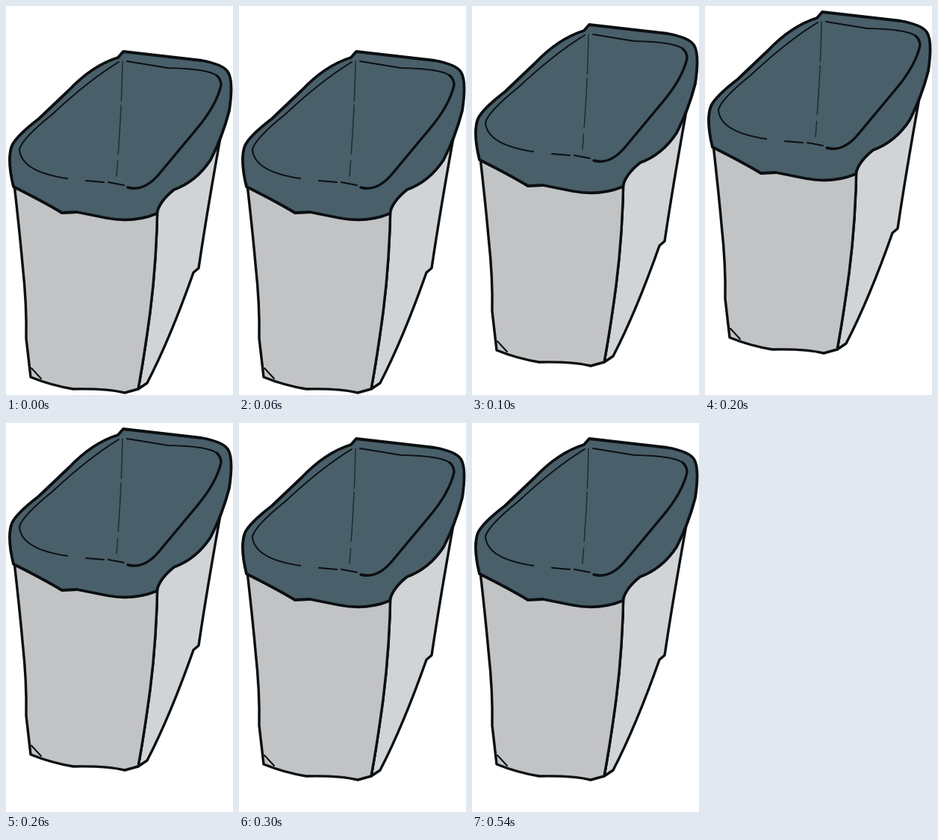
These frames come from a looping animation (304 by 521 pixels, 0.7 s). An HTML page:

```html
<!DOCTYPE html>
<html lang="en">
<head>
<meta charset="utf-8">
<title>Hopping bin</title>
<style>
  html, body { margin: 0; width: 100%; height: 100%; overflow: hidden; background: #fff; }
  svg { display: block; width: 304px; height: 521px; }
  #bin { animation: hop 700ms step-end infinite; }
  @keyframes hop {
    0% { transform: translateY(0); }
    14.2857% { transform: translateY(-36px); }
    28.5714% { transform: translateY(-53px); }
    42.8571%, 100% { transform: translateY(-40px); }
  }
  path { fill: none; stroke: #0b0f11; stroke-width: 3.4; stroke-linecap: round; stroke-linejoin: round; }
  .front { fill: #c2c3c5; }
  .side { fill: #d0d4d7; }
  .rim { fill: #495f6a; stroke-width: 3.8; }
  .thin { stroke-width: 2; }
  .crease { stroke-width: 1.5; stroke: #202d33; stroke-dasharray: 54 5 66 9; }
</style>
</head>
<body>
<svg viewBox="0 0 304 521">
  <g id="bin">
    <path class="side" d="M203 260 Q202 340 193 410 Q185 470 177 513 L189 505 Q220 445 251 357 L258 351 Q270 270 290 160 Z"/>
    <path class="front" d="M10 230 Q18 300 22 345 Q28 400 27 445 L33 497 Q60 508 90 513 Q135 512 159 518 L177 513 Q185 470 193 410 Q202 340 203 260 Z"/>
    <path class="thin" d="M34 485 L47 499 M184 475 L179 505"/>

    <path class="rim" d="M10 242 Q1 205 8 187 Q14 174 44 151 L84 113 Q115 80 150 69 L157 61 L262 73 Q290 78 297 88 Q305 100 299 140 Q290 175 274 206 Q255 235 225 246 Q205 262 202 278 Q170 291 135 284 L95 276 L75 277 Q50 262 10 242 Z"/>

    <!-- opening -->
    <path class="thin" d="M151 75 Q110 100 62 145 Q22 177 18 192 Q20 222 82 231"/>
    <path class="thin" d="M107 234 L131 236 M137 236 L158 240"/>
    <path d="M163 243 Q185 249 205 225 L255 165 Q282 133 288 106 Q288 98 282 93"/>
    <path class="thin" d="M282 93 Q270 84 217 83 L162 74"/>
    <path class="crease" d="M156 74 Q155 140 148 228"/>
  </g>
</svg>
</body>
</html>
```
